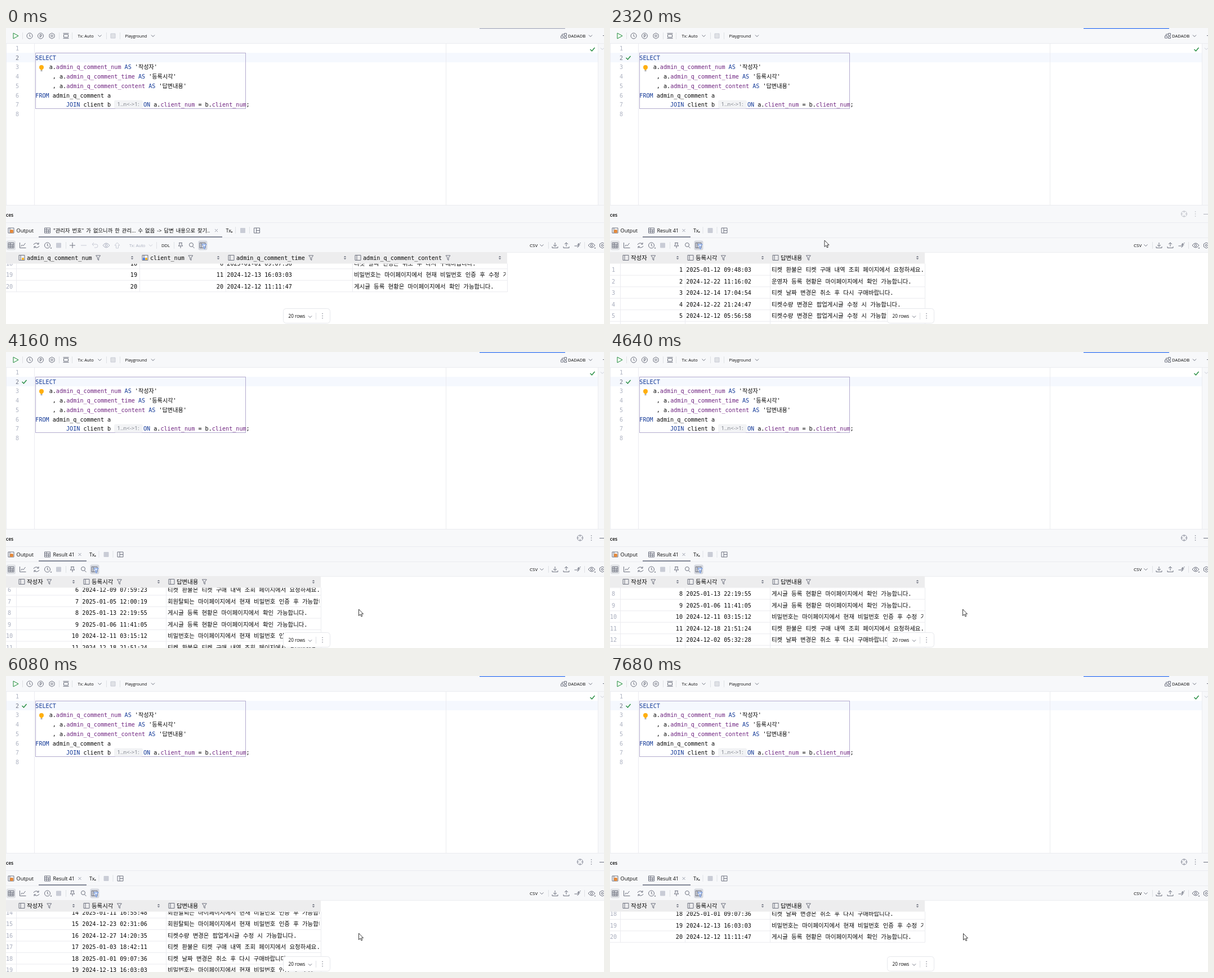
An HTML page with a canvas for the animation above (7.76 s loop, 1062 by 527 pixels).

```html
<!DOCTYPE html>
<html lang="ko">
<head>
<meta charset="utf-8">
<title>SQL console</title>
<style>
html, body { margin: 0; width: 100%; height: 100%; overflow: hidden; background: #fff; }
canvas { display: block; }
</style>
</head>
<body>
<canvas id="stage" width="1062" height="527"></canvas>
<script>
const ctx = document.getElementById('stage').getContext('2d');
const LOOP = 7760, STEP = 80, ROW = 20.5;
const FOCUS_AT = 960, RESULT_AT = 1200;

const MONO = '"DejaVu Sans Mono", "Noto Sans CJK KR", "Noto Sans CJK", monospace';
const SANS = '"Open Sans", "Noto Sans CJK KR", "Noto Sans CJK", sans-serif';
const INK = '#080808', ICON = '#6c707e', PALE = '#c9ccd6', LINE = '#ebecf0', BAR = '#f7f8fa';
const BLUE = '#3574f0', GREEN = '#208a3c', GOLD = '#ffaf0f';
const KEYWORD = '#143a98', FIELD = '#6f2480';

const CIRCLE = 'M-5 0a5 5 0 1 0 10 0a5 5 0 1 0-10 0';
const BOX = 'M-5-4.5H5V4.5H-5Z';
const ICONS = {
  play: 'M-4-5L5 0L-4 5Z',
  clock: CIRCLE + 'M0-3V.5L2 1.5',
  plan: CIRCLE + 'M-1 3V-2.5H.5a1.5 1.5 0 0 1 0 3.2H-1',
  gear: 'M0-5L4.5-2.5V2.5L0 5L-4.5 2.5V-2.5ZM-1.7 0a1.7 1.7 0 1 0 3.4 0a1.7 1.7 0 1 0-3.4 0',
  frame: 'M-4-2.5H4V2.5H-4ZM-5-4.5H5M-5 4.5H5',
  chevron: 'M-3-1.5L0 1.5L3-1.5',
  stop: 'M-4-4H4V4H-4Z',
  table: BOX + 'M-5-1.5H5M-1.5-4.5V4.5M2-1.5V4.5M-5 1.5H5',
  column: BOX + 'M-2-4.5V4.5',
  layout: BOX + 'M-1-4.5V4.5M-1 0H5',
  chart: 'M-5-5V4.5H6M-3 2L-1-1L1 1L5-4',
  refresh: 'M-5-1A5 4.5 0 0 1 4-2M5 1A5 4.5 0 0 1-4 2M4-5V-2H1M-4 5V2H-1',
  plus: 'M-5 0H5M0-5V5',
  minus: 'M-5 0H5',
  undo: 'M-2-5L-5-2L-2 1M-5-2H2a3 3 0 0 1 0 6H-1',
  eye: 'M-6 0Q0-8 6 0Q0 8-6 0ZM-2 0a2 2 0 1 0 4 0a2 2 0 1 0-4 0',
  up: 'M0-5L4.5 0H2V5H-2V0H-4.5Z',
  pin: 'M-3-4.5H3M-2-4.5V-1L-4 1H4L2-1V-4.5M0 1V5',
  search: 'M-4.5-1a3.5 3.5 0 1 0 7 0a3.5 3.5 0 1 0-7 0M1.5 2L4.5 5',
  load: 'M0-5V2M-3-1L0 2L3-1M-5 2V4.5H5V2',
  save: 'M0 2V-5M-3-2L0-5L3-2M-5 2V4.5H5V2',
  swap: 'M5-5L1-1M1-4V-1H4M-6 1H2M-1-2L2 1L-1 4',
  funnel: 'M-4-4H4L1 0V4.5L-1 3V0Z',
  sort: 'M-2-1L0-3L2-1ZM-2 1L0 3L2 1Z',
  cross: 'M-2.5-2.5L2.5 2.5M2.5-2.5L-2.5 2.5',
  check: 'M-4 0L-1 3L4-3',
  target: CIRCLE + 'M0-5V-2M0 5V2M-5 0H-2M5 0H2',
  schema: 'M-5 0H-1V4H-5ZM1-4.5H5V-.5H1ZM1 1.5H5V4.5H1ZM-3 0V-3H1',
  pointer: 'M0 0V11.5L2.7 9L4.5 13L6.3 12.2L4.6 8.3H8Z'
};
for (const k in ICONS) ICONS[k] = new Path2D(ICONS[k]);

const MESSAGES = {
  A: '티켓 환불은 티켓 구매 내역 조회 페이지에서 요청하세요.',
  B: '운영자 등록 현황은 마이페이지에서 확인 가능합니다.',
  C: '티켓 날짜 변경은 취소 후 다시 구매바랍니다.',
  D: '티켓수량 변경은 팝업게시글 수정 시 가능합니다.',
  E: '회원탈퇴는 마이페이지에서 현재 비밀번호 인증 후 가능합니다.',
  F: '게시글 등록 현황은 마이페이지에서 확인 가능합니다.',
  G: '비밀번호는 마이페이지에서 현재 비밀번호 인증 후 수정 가능합니다.'
};
const ROWS = `A2025-01-12 09:48:03
B2024-12-22 11:16:02
C2024-12-14 17:04:54
D2024-12-22 21:24:47
D2024-12-12 05:56:58
A2024-12-09 07:59:23
E2025-01-05 12:00:19
F2025-01-13 22:19:55
F2025-01-06 11:41:05
G2024-12-11 03:15:12
A2024-12-18 21:51:24
C2024-12-02 05:32:28
G2024-12-15 03:21:27
E2025-01-11 16:55:48
E2024-12-23 02:31:06
D2024-12-27 14:20:35
A2025-01-03 18:42:11
C2025-01-01 09:07:36
G2024-12-13 16:03:03
F2024-12-12 11:11:47`.split('\n');
const CLIENTS = { 18: 6, 19: 11, 20: 20 };

const OLD = {
  edges: [18, 237, 390, 615, 890],
  names: ['admin_q_comment_num', 'client_num', 'admin_q_comment_time', 'admin_q_comment_content'],
  size: 10.12,
  cells: (n, date, text) => [n, CLIENTS[n] || '', date, text]
};
const NEW = {
  edges: [18, 133, 284, 559],
  names: ['작성자', '등록시각', '답변내용'],
  size: 10.43,
  cells: (n, date, text) => [n, date, text]
};

// [time, value...] keys
const SCROLL = [[2560, 0], [3440, 59], [4640, 143.5], [5520, 203], [6640, 348.5], [7680, 355.5]];
const POINTER = [[160, -9, 44], [720, 17, 13], [1680, 17, 13], [2320, 381, 378], [2480, 424, 435],
  [3520, 424, 435], [4080, 626.5, 458], [7440, 626.5, 458], [7680, 627.5, 458.5]];

function at(keys, t) {
  if (t <= keys[0][0]) return keys[0].slice(1);
  for (let i = 1; i < keys.length; i++) {
    const a = keys[i - 1], b = keys[i];
    if (t <= b[0]) {
      const k = (t - a[0]) / (b[0] - a[0]);
      return a.slice(1).map((v, j) => v + (b[j + 1] - v) * k);
    }
  }
  return keys[keys.length - 1].slice(1);
}

function rect(x, y, w, h, color) {
  ctx.fillStyle = color;
  ctx.fillRect(x, y, w, h);
}

function round(x, y, w, h, r, fill, stroke) {
  ctx.beginPath();
  ctx.roundRect(x, y, w, h, r);
  ctx.fillStyle = fill;
  ctx.fill();
  if (stroke) {
    ctx.strokeStyle = stroke;
    ctx.stroke();
  }
}

function text(s, x, y, { size = 9, font = SANS, color = INK, weight = 400, align = 'left', gap = 0 } = {}) {
  ctx.font = `${weight} ${size}px ${font}`;
  ctx.wordSpacing = gap + 'px';
  ctx.fillStyle = color;
  ctx.textAlign = align;
  ctx.fillText(s, x, y);
  return ctx.measureText(s).width;
}

// The light weight only affects Hangul
const mono = (s, x, y, color = INK, align = 'left', size = 10.12) =>
  text(s, x, y, { size, font: MONO, color, align, weight: 300 });

function icon(name, x, y, color = ICON, fill = null, width = 1) {
  ctx.save();
  ctx.translate(x, y);
  if (fill) {
    ctx.fillStyle = fill;
    ctx.fill(ICONS[name]);
  }
  ctx.strokeStyle = color;
  ctx.lineWidth = width;
  ctx.stroke(ICONS[name]);
  ctx.restore();
}

function dots(x, y) {
  for (const d of [-4, 0, 4]) rect(x - .6, y + d - .6, 1.3, 1.3, ICON);
}

const sep = (x, y) => rect(x, y - 6, 1, 12, '#dfe1e5');

function toolbar(hover, focused) {
  rect(0, 0, 1062, 27, BAR);
  rect(0, 27, 1062, 1, LINE);
  rect(841, 0, 152, 1.3, focused ? BLUE : '#a8adbd');
  if (hover) round(6, 4, 22, 20, 4, '#e6e8ec');
  icon('play', 17, 14, GREEN, '#f2fcf3');
  icon('clock', 42, 14);
  icon('plan', 61.5, 14);
  icon('gear', 81.5, 14);
  icon('frame', 106.5, 14);
  text('Tx: Auto', 127.5, 17, { size: 7.5 });
  icon('chevron', 166.5, 14);
  icon('stop', 190, 14, PALE, '#dfe1e5');
  text('Playground', 211.5, 17, { size: 7.3 });
  icon('chevron', 261, 14);
  for (const x of [29, 94, 117, 178, 202]) sep(x, 14);
  icon('schema', 990.5, 14);
  text('DADADB', 998, 17, { size: 7.7 });
  icon('chevron', 1038, 14);
  rect(1060, 13, 2, 1, ICON);
}

function code(line, x, parts) {
  const y = 40 + (line - 1) * 16.7;
  for (const [s, color] of parts) x += mono(s, x, y, color);
}

function editor(done) {
  rect(0, 44.3, 1051, 16.7, '#f5f8fe');
  rect(50, 28, 1, 287, LINE);
  rect(781, 28, 1, 287, LINE);
  rect(0, 0, 1, 315, LINE);
  rect(1051, 28, 11, 287, BAR);
  rect(1051, 28, 1, 287, LINE);
  for (let n = 1; n < 9; n++)
    mono(n, 20, 40 + (n - 1) * 16.7, n === 2 ? '#767a8a' : '#aeb3c2', 'center');
  if (done) icon('check', 32.5, 53, GREEN, null, 1.4);
  icon('check', 1041.5, 38, GREEN, null, 1.4);
  icon('chevron', 1059, 37, PALE);

  ctx.lineWidth = 1;
  ctx.strokeStyle = '#b3abcf';
  ctx.strokeRect(52.5, 44.5, 373, 99);
  const field = (name, alias) => [['a.'], [name, FIELD], [' AS ', KEYWORD], [`'${alias}'`]];
  code(2, 52.3, [['SELECT', KEYWORD]]);
  code(3, 76.7, field('admin_q_comment_num', '작성자'));
  code(4, 82.8, [[', '], ...field('admin_q_comment_time', '등록시각')]);
  code(5, 82.8, [[', '], ...field('admin_q_comment_content', '답변내용')]);
  code(6, 52.3, [['FROM', KEYWORD], [' admin_q_comment a']]);
  code(7, 107, [['JOIN', KEYWORD], [' client b']]);
  code(7, 244, [['ON', KEYWORD], [' a.'], ['client_num', FIELD], [' = b.'], ['client_num', FIELD], [';']]);
  round(192, 128.5, 51, 15, 3, '#f2f3f5');
  text('1..n<->1:', 197.5, 139.3, { size: 9.7, color: '#7a7e87' });

  ctx.beginPath();
  ctx.arc(63, 70, 4, 0, 7);
  ctx.fillStyle = GOLD;
  ctx.fill();
  rect(61.5, 73, 3, 2, GOLD);
  rect(61.5, 75.6, 3, 1.2, ICON);
}

function panel(fresh, hover) {
  rect(0, 315, 1062, 84, BAR);
  for (const y of [315, 346, 373, 399]) rect(0, y, 1062, 1, LINE);
  text('ces', 0, 336, { size: 8.5, weight: 600 });
  ctx.globalAlpha = hover;
  icon('target', 1019.5, 331, '#818594');
  dots(1039.5, 331);
  icon('minus', 1059, 331.5);
  ctx.globalAlpha = 1;

  // tabs
  icon('column', 9, 360.5);
  round(7, 359, 6, 6, 2, '#e58a3c');
  text('Output', 18.5, 364, { size: 9.2 });
  icon('table', 73.5, 360.5);
  if (fresh) text('Result 41', 83.5, 364, { size: 9 });
  else text('"관리자 번호" 가 없으니까 한 관리... 수 없음 -> 답변 내용으로 찾기..', 84, 364, { size: 9.3, gap: 1.65 });
  const shift = fresh ? -242.5 : 0;
  rect(58, 371, 326 + (fresh ? -241 : 0), 2, '#858a99');
  icon('cross', 373.5 + shift, 360.5, '#9da1ae');
  text('Tx', 390.5 + shift, 363.5, { size: 9 });
  rect(400 + shift, 362.5, 2, 1.5, INK);
  sep(407 + shift, 360);
  icon('stop', 420.5 + shift, 360.5, PALE, PALE);
  sep(432 + shift, 360);
  icon('layout', 445.5 + shift, 360.5);

  // grid actions
  const y = 387;
  round(1, 378.5, 16, 17, 3, '#dfe1e5');
  icon('table', 9, y);
  icon('chart', 29.5, y);
  icon('refresh', 54, y);
  icon('clock', 73.5, y);
  rect(79, 391, 2, 1.5, ICON);
  icon('stop', 93.5, y, PALE, PALE);
  sep(106, y);
  if (!fresh) {
    icon('plus', 118, y);
    icon('minus', 138, y, PALE);
    icon('undo', 158, y, PALE);
    icon('eye', 178, y, '#a8adbd');
    icon('up', 197.5, y, PALE);
    text('Tx: Auto', 219, y + 3, { size: 7.5, color: '#a8adbd' });
    icon('chevron', 257, y, PALE);
    sep(267, y);
    text('DDL', 276, y + 3, { size: 7.6 });
    sep(298, y);
  }
  const move = fresh ? -192 : 0;
  icon('pin', 310 + move, y);
  icon('search', 330 + move, y);
  round(341.5 + move, 378.5, 16, 17, 3, '#d5d8df');
  icon('column', 349 + move, y);
  icon('funnel', 352 + move, 389, '#5f8be0', '#e7effd');
  text('CSV', 930, y + 3, { size: 8 });
  icon('chevron', 951.5, y);
  sep(963, y);
  icon('load', 975, y);
  icon('save', 995, y);
  icon('swap', 1015.5, y);
  sep(1027, y);
  icon('eye', 1040, y);
  rect(1045, 391, 2, 1.5, ICON);
  icon('gear', 1059, y);
}

function clipped(x, y, w, h, draw) {
  ctx.save();
  ctx.beginPath();
  ctx.rect(x, y, w, h);
  ctx.clip();
  draw();
  ctx.restore();
}

function grid(view, scroll) {
  const { edges, names, size } = view, right = edges[edges.length - 1];
  clipped(0, 419.5, right + 1, 108, () => {
    ROWS.forEach((row, i) => {
      const top = 420 + i * ROW - scroll, base = top + 14.2, n = i + 1;
      if (top > 527 || top < 395) return;
      rect(0, top + ROW - .75, right, 1, LINE);
      mono(n, 6, base, '#a8adbd', 'center');
      view.cells(n, row.slice(1), MESSAGES[row[0]]).forEach((value, c) => {
        const x = edges[c], end = edges[c + 1];
        if (c === names.length - 1)
          clipped(x, top, end - x - 2.5, ROW, () => mono(value, x + 3, base, INK, 'left', 10.43));
        else if (c === names.length - 2) mono(value, x + 2.3, base);
        else mono(value, end - 4, base, INK, 'right');
      });
    });
    const end = Math.min(527, 420 + ROWS.length * ROW - scroll);
    for (const x of edges) rect(x, 419, 1, end - 419, LINE);
  });

  rect(0, 399, right, 20.5, '#ededee');
  names.forEach((name, c) => {
    const x = edges[c];
    icon('column', x + 10, 409);
    if (view === OLD && c < 2) {
      round(x + 10, 409, 4, 4, 2, GOLD);
      if (c) round(x + 6, 409, 4, 4, 2, BLUE);
    }
    const w = mono(name, x + 19, 412.8, INK, 'left', size);
    icon('funnel', x + 30 + w, 409);
    icon('sort', edges[c + 1] - 13, 409, ICON, ICON, .3);
  });
}

function pager() {
  ctx.lineWidth = 1;
  round(492.5, 499.5, 83, 26, 5, '#fff', '#e6e8ec');
  text('20 rows', 501.5, 516.3, { size: 8.2 });
  icon('chevron', 540, 514);
  sep(550, 513);
  dots(562, 512.5);
}

function draw(t) {
  const fresh = t >= RESULT_AT;
  rect(0, 0, 1062, 527, '#fff');
  editor(fresh);
  toolbar(t >= 640 && t < 1760, t >= FOCUS_AT);
  panel(fresh, at([[2160, 0], [2480, 1]], t)[0]);
  grid(fresh ? NEW : OLD, fresh ? at(SCROLL, t)[0] : 360);
  pager();
  if (t > 160) icon('pointer', ...at(POINTER, t), '#222', '#fff', .9);
}

const start = performance.now();
function tick() {
  const t = (performance.now() - start) % LOOP;
  draw(Math.floor(t / STEP) * STEP);
  requestAnimationFrame(tick);
}
tick();
</script>
</body>
</html>
```
